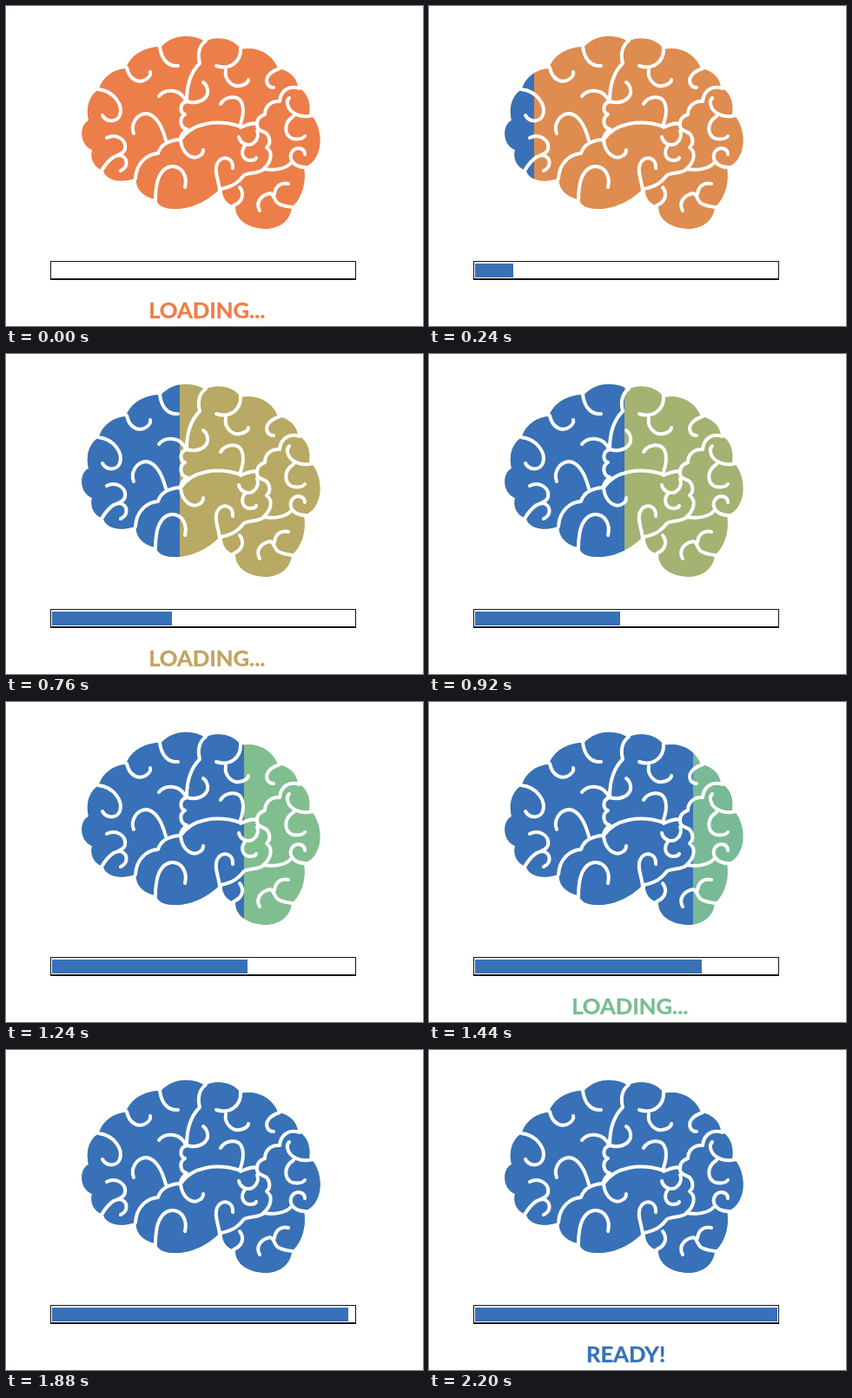
An HTML page that plays this animation: 480x369 px, repeating every 3.4 s.

```html
<!DOCTYPE html>
<html>
<head>
<meta charset="utf-8">
<style>
html, body { margin: 0; width: 100%; height: 100%; overflow: hidden; background: #fff; }
svg { display: block; width: 100%; height: 100%; }
text { font: 700 25.6px Lato, "Open Sans", sans-serif; stroke-width: .4; }
.crisp { shape-rendering: crispEdges; }
</style>
</head>
<body>
<svg viewBox="0 0 480 369">
  <clipPath id="brain">
    <path d="M178 48C190 33 214 31 229 41C241 34 263 37 270 50C286 46 306 53 313 72
      C325 74 335 82 336 94C347 99 351 112 349 124C360 132 366 156 358 172C354 181 348 184 343 186
      C346 203 341 219 332 229L329 232C327 250 312 257 298 257C280 256 264 248 264 231
      C254 229 248 220 249 211L245 212C235 222 215 235 193 234C182 234 174 230 173 223
      C158 221 148 210 150 198C135 205 115 202 112 190C103 187 96 178 99 166
      C84 160 84 137 95 132C91 115 97 102 107 96C110 84 122 73 138 72C143 57 158 48 175 47Z"/>
  </clipPath>
  <g clip-path="url(#brain)" class="crisp">
    <rect id="rest" x="80" y="30" width="290" height="235"/>
    <rect id="done" x="80" y="30" height="235" fill="#3871b7"/>
  </g>
  <g fill="none" stroke="#fff" stroke-width="4" stroke-linecap="round" stroke-linejoin="round">
    <path d="M177 47C179 62 187 70 198 69
      M139 71C142 86 154 90 162 84C166 81 167 79 166 76
      M106 96C125 98 135 115 131 126C127 135 115 134 111 126
      M116 152C126 147 139 153 137 165C135 171 129 172 124 174C118 178 114 183 110 190
      M130 172C140 173 142 185 132 190
      M147 147C143 137 150 124 162 124C174 126 180 140 184 155
      M149 199C150 181 162 171 175 170C178 160 186 155 200 154"/>
    <path d="M208 142C204 146 200 150 201 155C203 171 215 179 224 172Q227 170 227 166
      M201 154C214 135 242 130 270 139
      M230 40C221 47 221 58 223 66C214 75 208 90 208 109
      M176 104C184 94 202 96 207 110
      M208 110C218 113 229 110 232 101C233 95 230 90 227 88
      M208 110C199 113 200 123 206 125C199 129 200 140 208 142
      M247 113C252 104 267 102 271 111C275 120 272 130 269 139"/>
    <path d="M242 69C256 74 271 66 270 48
      M253 74C251 84 260 94 269 92C275 91 279 88 279 85
      M315 72C303 76 298 83 301 90Q303 94 308 94
      M338 95C325 91 316 98 315 110C305 109 298 116 298 125C292 127 289 130 289 136C283 134 277 137 270 140
      M353 126C340 130 326 124 324 113Q323 109 326 106
      M331 127C319 135 320 149 330 153C337 154 342 153 344 150
      M345 186C330 186 324 175 330 167C336 161 344 165 344 171"/>
    <path d="M247 211C262 208 268 203 274 195C281 191 290 194 297 188C308 190 322 188 328 181
      M289 136C288 143 295 144 300 147C305 153 304 160 300 163C308 169 305 181 296 188
      M268 151C270 160 280 162 285 158C290 154 291 148 289 144
      M275 161C269 169 273 178 281 178Q287 178 288 175
      M172 224C172 201 178 187 190 185C203 184 209 197 206 209
      M246 213C245 201 239 190 243 182C247 172 262 173 261 187
      M269 209C275 217 272 226 262 230
      M292 236C287 227 293 218 304 216C309 217 309 226 314 228Q320 231 330 232
      M309 217C310 208 316 203 325 205"/>
  </g>
  <g class="crisp">
    <rect x="51" y="294" width="352" height="22" fill="#151515"/>
    <rect x="52" y="295" width="350" height="19" fill="#fff"/>
    <rect id="bar" x="53" y="297" height="16" fill="#3871b7"/>
  </g>
  <text id="label" y="359.5"></text>
</svg>
<script>
const LOOP = 3400, STEP = 40, FULL = 1920, BLINK = 400;
const [rest, done, bar, label] = ["rest", "done", "bar", "label"].map(id => document.getElementById(id));
const stops = [
  [0, 236, 126, 74], [480, 208, 154, 86], [760, 184, 169, 100], [920, 164, 178, 114],
  [1240, 128, 190, 143], [1640, 112, 181, 156], [1920, 100, 172, 160]
];

function tint(t) {
  t = Math.max(0, Math.min(t, FULL));
  const i = Math.max(1, stops.findIndex(s => s[0] >= t));
  const a = stops[i - 1], b = stops[i], k = (t - a[0]) / (b[0] - a[0]);
  return `rgb(${[1, 2, 3].map(c => Math.round(a[c] + (b[c] - a[c]) * k))})`;
}

function draw(now) {
  const t = Math.floor(now % LOOP / STEP) * STEP;
  const p = Math.min(t / FULL, 1);
  const ready = t >= 2120;
  const on = ready || Math.floor((t + 280) / BLINK) % 2 === 0;
  const ink = ready ? "#3871b7" : tint(t - 90);

  rest.setAttribute("fill", tint(t));
  done.setAttribute("width", 4 + 293.8 * p);
  bar.setAttribute("width", Math.round(348 * p));

  label.textContent = ready ? "READY!" : "LOADING...";
  label.setAttribute("x", ready ? 181 : 164.2);
  label.setAttribute("fill", ink);
  label.setAttribute("stroke", ink);
  label.setAttribute("visibility", on ? "visible" : "hidden");
}

let start;
function tick(now) {
  start ??= now;
  draw(now - start);
  requestAnimationFrame(tick);
}
draw(0);
requestAnimationFrame(tick);
</script>
</body>
</html>
```
